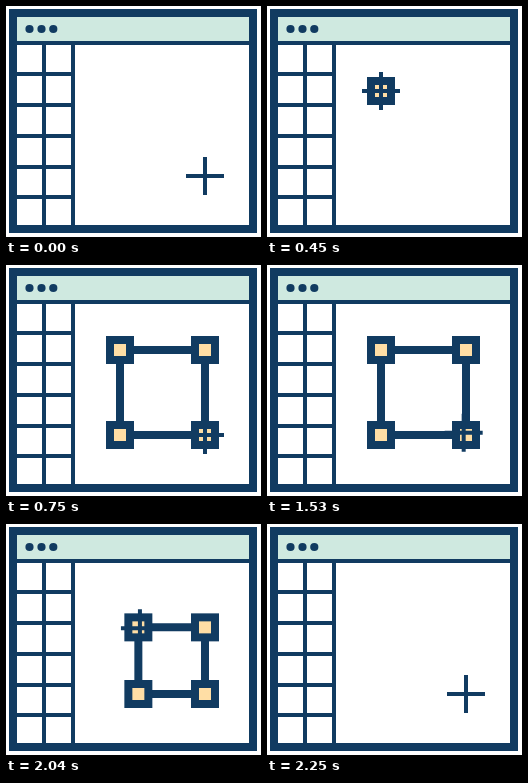
Animation of 255x231 px, one loop 2550 ms. Source, as an HTML page:

```html
<!DOCTYPE html>
<html lang="en">
<head>
<meta charset="utf-8">
<title>Drawing a square</title>
<style>
  html, body { margin: 0; width: 100%; height: 100%; overflow: hidden; background: #fff; }
  svg { display: block; width: 100vw; height: 100vh; }
  .line { fill: none; stroke: #113b61; }
  .navy { fill: #113b61; }
  .mint { fill: #cfe9e0; }
  .tan { fill: #ffdea5; }
</style>
</head>
<body>
<svg viewBox="0 0 255 231">
  <rect class="mint" x="11" y="11" width="232" height="25"/>
  <g class="navy">
    <circle cx="23.5" cy="23" r="4.1"/>
    <circle cx="35.5" cy="23" r="4.1"/>
    <circle cx="47.3" cy="23" r="4.1"/>
  </g>
  <path class="line" stroke-width="4"
    d="M7 37H247 M38 37V223 M67 37V223 M7 68H67 M7 99H67 M7 130H67 M7 161H67 M7 191H67"/>
  <rect class="line" x="7" y="7" width="240" height="216" stroke-width="8"/>
  <g id="shape">
    <path id="edges" class="line" stroke-width="8"/>
    <g id="handles"></g>
  </g>
  <path id="cursor" class="line" stroke-width="4" d="M-19 0H19 M0 -19V19"/>
</svg>
<script>
  const LOOP = 2550, STEP = 30, MOVE = 300;
  const topLeft = [114, 85], bottomRight = [199, 170], grab = [116, 86];

  const byId = id => document.getElementById(id);
  const shape = byId('shape'), edges = byId('edges'), cursor = byId('cursor');
  const handles = byId('handles');
  handles.innerHTML = ('<g><rect class="navy" x="-14" y="-14" width="28" height="28"/>' +
    '<rect class="tan" x="-6" y="-6" width="12" height="12"/></g>').repeat(4);

  const place = (el, [x, y]) => el.setAttribute('transform', `translate(${x} ${y})`);

  function ease(t, start) {
    const p = Math.min(1, Math.max(0, (t - start) / MOVE));
    return p * p * (3 - 2 * p);
  }

  const mix = (a, b, p) => a.map((v, i) => v + (b[i] - v) * p);

  function drawShape([x0, y0], [x1, y1]) {
    edges.setAttribute('d', `M${x0} ${y0}H${x1}V${y1}H${x0}Z`);
    [[x0, y0], [x1, y0], [x0, y1], [x1, y1]]
      .forEach((point, i) => place(handles.children[i], point));
  }

  function render(t) {
    const visible = t >= 450 && t < 2250;
    shape.setAttribute('visibility', visible ? 'visible' : 'hidden');
    drawShape(
      mix(topLeft, bottomRight, ease(t, 1950)),
      mix(topLeft, bottomRight, ease(t, 450))
    );

    let point;
    if (t < 450) point = mix(bottomRight, topLeft, ease(t, 0));
    else if (t < 1500) point = mix(topLeft, bottomRight, ease(t, 450));
    else if (t < 1950) point = mix(bottomRight, grab, ease(t, 1500));
    else point = mix(grab, bottomRight, ease(t, 1950));
    place(cursor, point);
  }

  const begin = performance.now();
  function tick() {
    const t = (performance.now() - begin) % LOOP;
    render(Math.floor(t / STEP) * STEP);
    requestAnimationFrame(tick);
  }
  tick();
</script>
</body>
</html>
```
